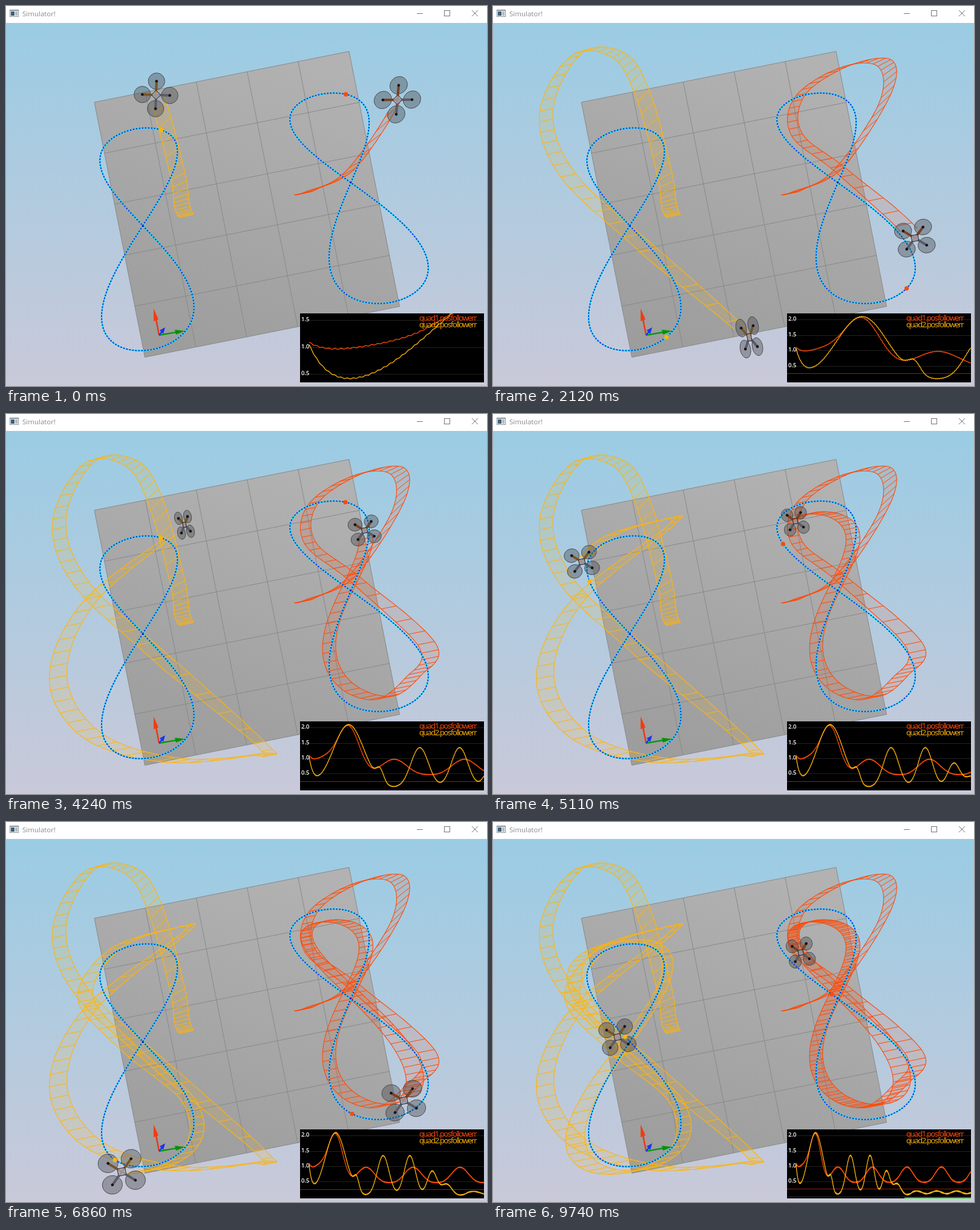
An HTML page with a canvas for the animation above (9860 ms loop, 795 px wide and 628 px high).

```html
<!DOCTYPE html>
<html lang="en">
<head>
<meta charset="utf-8">
<title>Simulator</title>
<style>
  html, body { margin: 0; width: 100%; height: 100%; overflow: hidden; }
  canvas { display: block; }
</style>
</head>
<body>
<canvas id="stage" width="795" height="628"></canvas>
<script>
const ctx = document.getElementById('stage').getContext('2d');
const LOOP = 9860, STEP = 124.85, LEAD = 1060, LAP = 4240, KNOT = LAP / 12, RUNG = 62;
const ORANGE = '#ff4a08', YELLOW = '#ffb40a';

// Each quad chases a figure eight (goal). It swings in through a few key points,
// one per KNOT, then settles on its own lagging figure eight (orbit).
const quads = [
  {
    color: YELLOW, arm: '#98600f', side: 1, lag: 2, swing: 10,
    goal: { c: [226, 363], u: [-10.5, -180], v: [69.5, -11], k: 0.123 },
    orbit: { c: [218, 367], u: [-10, -188], v: [83, -12], k: 0.108 },
    opening: [[298, 347], [291, 330], [283, 275], [248, 147], [208, 82], [138, 80], [88, 175],
      [123, 278], [245, 393], [423, 547], [412, 563], [272, 572], [141, 530], [86, 433],
      [140, 308], [294, 184], [285, 174], [183, 208], [131, 289], [203, 374]]
  },
  {
    color: ORANGE, arm: '#93400f', side: -1, lag: 31, swing: 8,
    goal: { c: [570, 292], u: [-57, -168], v: [69.7, -13.5], k: 0.15 },
    orbit: { c: [569, 279], u: [-40, -144], v: [56, 0], k: 0.245 },
    opening: [[488, 310], [504, 305], [570, 270], [647, 155], [648, 95], [582, 100], [508, 148],
      [502, 212], [578, 274], [697, 383], [672, 435]]
  }
];

const clamp = (v, lo, hi) => Math.max(lo, Math.min(hi, v));
const bell = (t, centre, width) => Math.exp(-(((t - centre) / width) ** 2));
const rad = deg => deg * Math.PI / 180;
const goalAngle = t => 70.3 + t * 0.0849;

// Figure eight seen in perspective.
function eight({ c, u, v, k }, deg) {
  const s = Math.sin(rad(deg)), w = Math.sin(rad(2 * deg));
  return c.map((o, i) => o + (s * u[i] + w * v[i]) / (1 + k * s));
}

function orbitAt(q, t) {
  const a = goalAngle(t) - q.lag;
  return eight(q.orbit, a + q.swing * Math.sin(rad(a)));
}

function positionAt(q, t) {
  const u = Math.max(0, (t + LEAD) / KNOT), i = Math.floor(u), f = u - i;
  if (i >= q.opening.length) return orbitAt(q, t);
  const knot = j => q.opening[Math.max(0, j)] || orbitAt(q, j * KNOT - LEAD);
  const [a, b, c, d] = [-1, 0, 1, 2].map(n => knot(i + n));
  return b.map((p, n) => p + f / 2 * (c[n] - a[n] +
    f * (2 * a[n] - 5 * p + 4 * c[n] - d[n] + f * (3 * p - a[n] - 3 * c[n] + d[n]))));
}

// Position with the airframe's lateral and forward axes on screen.
function frameAt(q, t) {
  const [x, y] = positionAt(q, t), h = 265;
  const push = positionAt(q, t + h)[0] - 2 * x + positionAt(q, t - h)[0];
  const launch = bell(t, 0, 450);
  const size = (19.5 + 0.029 * y) * (1 + 0.35 * launch);
  const roll = size * clamp(1 + q.side * push / 300, 0.55, 1.1);
  const yaw = -0.2 - 0.55 * launch;
  return {
    x, y,
    lat: [roll * Math.cos(yaw), roll * Math.sin(yaw)],
    fwd: [size * Math.sin(yaw), -size * Math.cos(yaw)]
  };
}

for (const q of quads) {
  q.rungs = [];
  for (let t = -LEAD; t < LOOP; t += RUNG / 2) {
    const { x, y, lat } = frameAt(q, t);
    q.rungs.push([-0.42, 0.42].map(s => [x + s * lat[0], y + s * lat[1]]));
  }
}

// Follow errors over simulated time: a launch, a few swings, then a steady ripple.
const yellowSwings = [[1200, 660, 2.06], [2150, 160, 0.4], [3356, 380, 1.31], [4565, 360, 1.31],
  [5576, 310, 0.8], [6230, 340, 0.38]];
function yellowErr(t) {
  const swings = yellowSwings.reduce((sum, [at, width, high]) => sum + high * bell(t, at, width), 0);
  const settled = clamp((t - 6700) / 500, 0, 1);
  return 0.95 * Math.exp(-t / 130) + swings + settled * (0.1 + 0.045 * Math.cos((t - 7450) / 196))
    + 0.01 * Math.sin(t * 0.17);
}
function orangeErr(t) {
  const a = (t - 2580) / 2130 * 2 * Math.PI;
  return 0.4 * Math.exp(-t / 150) + 1.55 * bell(t, 1200, 460)
    + 0.64 + 0.25 * Math.cos(a) + 0.04 * Math.cos(2 * a) + 0.01 * Math.sin(t * 0.17);
}

function trace(points, close) {
  ctx.beginPath();
  points.forEach(p => ctx.lineTo(p[0], p[1]));
  if (close) ctx.closePath();
}
function line(points, color, width = 1) {
  trace(points);
  ctx.strokeStyle = color;
  ctx.lineWidth = width;
  ctx.stroke();
}
function fill(points, color) {
  trace(points, true);
  ctx.fillStyle = color;
  ctx.fill();
}
function box(x, y, w, h, color) {
  ctx.fillStyle = color;
  ctx.fillRect(x, y, w, h);
}
function dot(x, y, r, color) {
  ctx.beginPath();
  ctx.arc(x, y, r, 0, 7);
  ctx.fillStyle = color;
  ctx.fill();
}
function text(str, x, y, font, color) {
  ctx.font = font + ' "Open Sans", sans-serif';
  ctx.fillStyle = color;
  ctx.fillText(str, x, y);
}
function gradient(x0, y0, x1, y1, from, to) {
  const g = ctx.createLinearGradient(x0, y0, x1, y1);
  g.addColorStop(0, from);
  g.addColorStop(1, to);
  return g;
}

function drawWindow() {
  box(0, 28, 795, 600, gradient(0, 28, 0, 628, '#9acce4', '#c9c9d9'));
  box(0, 0, 795, 28, '#fff');
  box(6, 6, 15, 12, '#8b959c');
  box(7, 8, 13, 9, '#f4f6f8');
  box(8, 9, 6, 7, '#3f5f78');
  box(15, 9, 4, 7, '#b5bcc2');
  text('Simulator!', 27, 17, '11.5px', '#8c8c8c');
  line([[679, 12.5], [689, 12.5]], '#777');
  ctx.strokeRect(724.5, 7.5, 9, 9);
  line([[770, 7], [780, 17]], '#777');
  line([[780, 7], [770, 17]], '#777');
}

function drawFloor() {
  const at = (u, v) => [146 + 421 * u + 83.5 * v, 159 - 84 * u + 421.5 * v];
  fill([at(0, 0), at(1, 0), at(1, 1), at(0, 1)], gradient(480, 80, 300, 570, '#b2b2b2', '#9d9d9d'));
  for (let i = 0; i <= 5; i++) {
    line([at(i / 5, 0), at(i / 5, 1)], '#898989');
    line([at(0, i / 5), at(1, i / 5)], '#898989');
  }
}

function drawGoal({ goal }) {
  const points = [];
  for (let d = 0; d <= 360; d += 2) points.push(eight(goal, d));
  line(points, '#16d8fa', 2);
  ctx.setLineDash([2, 3]);
  line(points, '#0a22d0', 2);
  ctx.setLineDash([]);
}

function drawRibbon({ rungs, color }, t) {
  const shown = rungs.slice(0, Math.ceil((t - 35 + LEAD) / RUNG * 2));
  ctx.globalAlpha = 0.12;
  for (let i = 2; i < shown.length; i += 2) {
    const [a, b, c] = shown.slice(i - 2, i + 1);
    fill([a[0], b[0], c[0], c[1], b[1], a[1]], color);
  }
  ctx.globalAlpha = 1;
  for (let i = 0; i < shown.length; i += 2) line(shown[i], color);
  for (const edge of [0, 1]) line(shown.map(r => r[edge]), color, 1.1);
}

function drawQuad(q, t) {
  const { x, y, lat, fwd } = frameAt(q, t);
  const p = fwd.map((f, i) => (f - lat[i]) / 2), r = fwd.map((f, i) => (f + lat[i]) / 2);
  const at = (u, v) => [x + u * p[0] + v * r[0], y + u * p[1] + v * r[1]];
  const corners = [[-1, 0], [0, -1], [1, 0], [0, 1]];
  corners.forEach(([u, v], i) => {
    const hub = at(u, v);
    line([[x, y], hub], i < 2 ? '#6a6a7a' : q.arm, 4);
    ctx.save();
    ctx.transform(...p, ...r, ...hub);
    ctx.beginPath();
    ctx.arc(0, 0, 0.6, 0, 7);
    ctx.restore();
    ctx.fillStyle = 'rgba(72,72,76,.4)';
    ctx.fill();
    ctx.strokeStyle = '#4a4d50';
    ctx.lineWidth = 1;
    ctx.stroke();
    dot(...hub, 2.3, '#151515');
  });
  fill(corners.map(([u, v]) => at(u / 3, v / 3)), 'rgba(165,165,180,.75)');
  ctx.strokeStyle = '#222';
  ctx.stroke();
}

function drawAxes() {
  line([[253, 544], [248, 518]], '#e83a14', 2.5);
  fill([[244, 500], [244, 521], [252, 518]], '#f23c10');
  line([[253, 544], [282, 539]], '#0a9a14', 2.5);
  fill([[296, 537], [279, 535], [281, 543]], '#079008');
  line([[253, 544], [258, 538]], '#1838f0', 2.5);
  fill([[263, 531], [254, 536], [260, 542]], '#1a34f0');
}

function drawChart(t) {
  const span = t + LEAD, traces = [[orangeErr, ORANGE], [yellowErr, YELLOW]];
  let min = 9, max = 0;
  for (let s = 0; s < span * 0.8; s += 15) {
    for (const [err] of traces) {
      min = Math.min(min, err(s));
      max = Math.max(max, err(s));
    }
  }
  const yAt = v => 616 - 103 * (v - min) / (max - min);
  const rule = (y, color) => line([[486, y], [790, y]], color);
  ctx.save();
  ctx.beginPath();
  ctx.rect(486, 508, 304, 114);
  ctx.clip();
  box(486, 508, 304, 114, '#000');
  for (let v = 0; v <= 2; v += 0.5) {
    const y = Math.round(yAt(v));
    rule(y + 2.5, '#222');
    if (v && y > 512) text(v.toFixed(1), 488, y + 3.5, '600 9.5px', '#fff');
  }
  rule(Math.round(yAt(0.2)) - 0.5, '#8a2410');
  for (const [err, color] of traces) {
    const points = [];
    for (let s = 0; s <= span; s += 9) points.push([501 + 289 * s / span, yAt(err(s))]);
    line(points, color, 1.3);
  }
  if (t > 9500) line([[680, 621.5], [790, 621.5]], '#20e020', 2);
  ctx.letterSpacing = '-1.35px';
  text('quad1.posfollowerr', 683, 520, '13px', ORANGE);
  text('quad2.posfollowerr', 683, 531, '13px', YELLOW);
  ctx.restore();
}

function draw(now) {
  const t = Math.floor((now % LOOP + 12) / STEP) * STEP % LOOP;
  drawWindow();
  drawFloor();
  quads.forEach(q => drawRibbon(q, t));
  quads.forEach(drawGoal);
  drawAxes();
  quads.forEach(q => drawQuad(q, t));
  quads.forEach(q => dot(...eight(q.goal, goalAngle(t)), 3.6, q.color));
  drawChart(t);
  requestAnimationFrame(() => draw(performance.now()));
}
draw(0);
</script>
</body>
</html>
```
